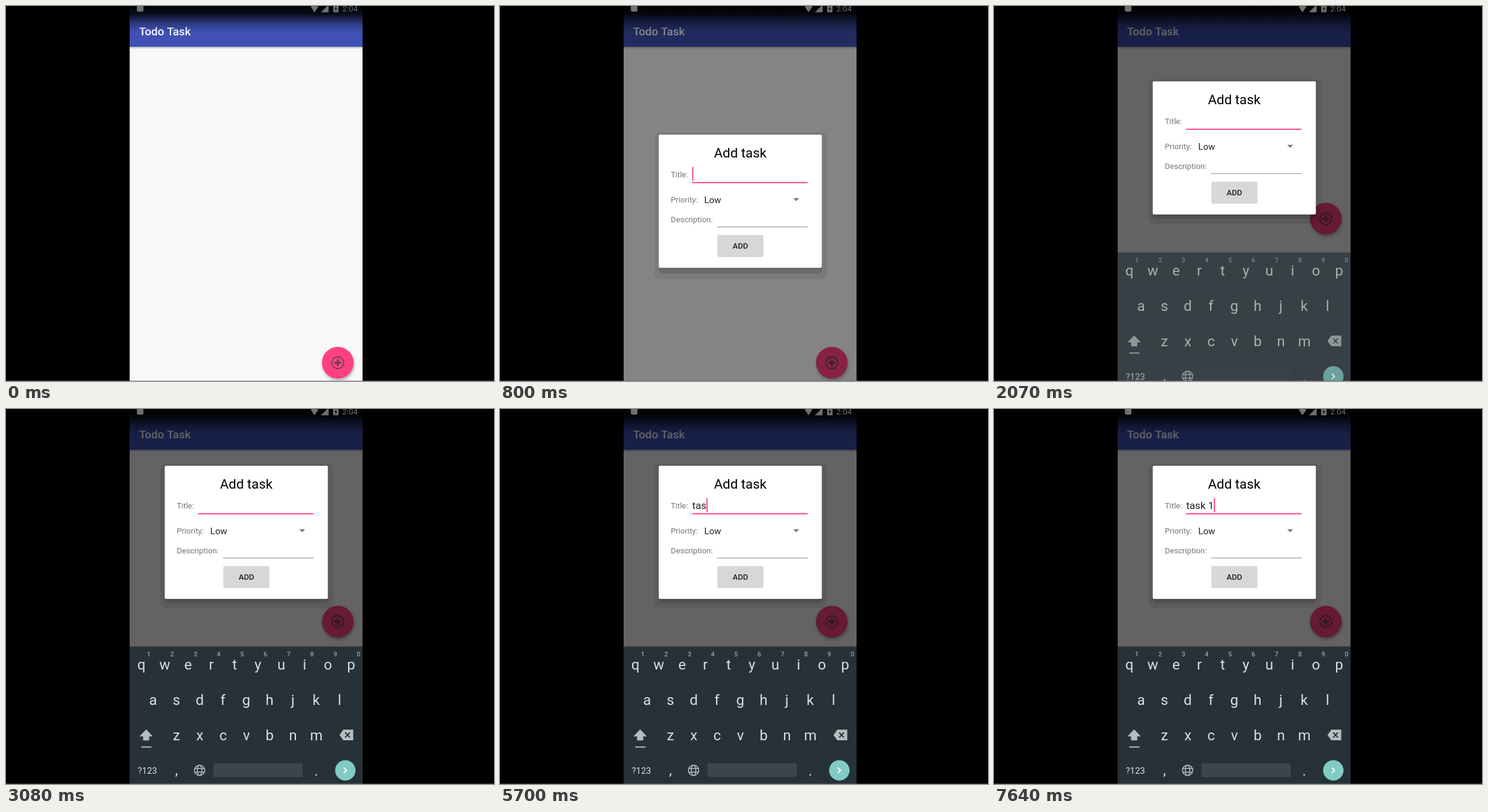
An HTML page with a canvas for the animation above (8000 ms loop, 813 by 626 pixels).

```html
<!DOCTYPE html>
<html lang="en">
<head>
<meta charset="utf-8">
<title>Todo Task</title>
<style>
html, body { margin: 0; width: 100%; height: 100%; overflow: hidden; background: #000; }
canvas { display: block; }
</style>
</head>
<body>
<canvas id="stage" width="813" height="626"></canvas>
<script>
const ctx = document.getElementById('stage').getContext('2d');
const LOOP = 8000;
const LEFT = 206, RIGHT = 594, WIDTH = RIGHT - LEFT;
const PINK = '#ff4081', KEY_TEXT = '#dcdfe0', KEY_ICON = '#b7bcbf', PRESSED = '#3f484d';
const PITCH = 38.83;
const ROWS = [
  { keys: 'qwertyuiop', x: 225.6, base: 434.5, top: 403 },
  { keys: 'asdfghjkl', x: 245, base: 493.5, top: 463 },
  { keys: 'zxcvbnm', x: 284, base: 552.5, top: 523 }
];

// Stepped timelines: [start ms, value]
const DIM = [[0, 0], [680, 0.26], [800, 0.47], [950, 0.57], [1070, 0.6]];
const FADE = [[0, 0], [680, 0.9], [800, 1]];
const RIPPLE = [[0, 0], [530, 20], [680, 0]];
const LIFT = [[0, 0], [2070, 89], [2220, 117], [2340, 120]];
const BOARD = [[0, 0], [2070, 0.7], [2220, 0.95], [2340, 1]];
const TYPED = [[0, ''], [5130, 't'], [5430, 'ta'], [5700, 'tas'], [6220, 'task'], [6630, 'task '], [7640, 'task 1']];
const HELD = [[0, ''], [4980, 't'], [5130, ''], [5280, 'a'], [5430, ''], [5550, 's'], [5700, ''],
  [6100, 'k'], [6220, ''], [6500, ' '], [6630, ''], [7060, 'q'], [7360, '']];
const BLINKS = [1070, 1520, 2070, 2490, 3080, 3550, 3980, 4570, 7210, 7640];

function at(line, t) {
  let value = line[0][1];
  for (const [start, v] of line) if (t >= start) value = v;
  return value;
}

function rect(x, y, w, h, color, r = 0) {
  ctx.fillStyle = color;
  ctx.beginPath();
  ctx.roundRect(x, y, w, h, r);
  ctx.fill();
}

function circle(x, y, r, color) {
  ctx.fillStyle = color;
  ctx.beginPath();
  ctx.arc(x, y, r, 0, Math.PI * 2);
  ctx.fill();
}

function poly(color, ...p) {
  ctx.fillStyle = color;
  ctx.beginPath();
  for (let i = 0; i < p.length; i += 2) ctx.lineTo(p[i], p[i + 1]);
  ctx.closePath();
  ctx.fill();
}

function line(color, width, ...p) {
  ctx.strokeStyle = color;
  ctx.lineWidth = width;
  ctx.beginPath();
  for (let i = 0; i < p.length; i += 2) ctx.lineTo(p[i], p[i + 1]);
  ctx.stroke();
}

function text(str, x, y, size, color, align = 'left', weight = 400) {
  ctx.font = `${weight} ${size}px Roboto, sans-serif`;
  ctx.textAlign = align;
  ctx.fillStyle = color;
  ctx.fillText(str, x, y);
}

function drawFab(y, ripple) {
  const x = 552.8, ink = '#63434f';
  ctx.save();
  ctx.shadowColor = 'rgba(0,0,0,0.3)';
  ctx.shadowBlur = 5;
  ctx.shadowOffsetX = 1;
  ctx.shadowOffsetY = 3;
  circle(x, y, 26.4, PINK);
  ctx.restore();
  if (ripple) circle(x, y, ripple, 'rgba(255,255,255,0.22)');
  ctx.strokeStyle = ink;
  ctx.lineWidth = 1.7;
  ctx.beginPath();
  ctx.arc(x, y, 9.9, 0, Math.PI * 2);
  ctx.stroke();
  rect(x - 5.6, y - 1.5, 11.2, 3, ink);
  rect(x - 1.5, y - 5.6, 3, 11.2, ink);
}

function drawApp(t) {
  rect(LEFT, 0, WIDTH, 626, '#f8f8fa');
  const shade = ctx.createLinearGradient(0, 68, 0, 72);
  shade.addColorStop(0, 'rgba(0,0,0,0.28)');
  shade.addColorStop(1, 'rgba(0,0,0,0)');
  rect(LEFT, 68, WIDTH, 4, shade);
  rect(LEFT, 0, WIDTH, 68, '#3f51b5');
  text('Todo Task', 221.7, 49, 18.9, '#fff', 'left', 500);
  drawFab(t < 2070 ? 595.5 : 355, at(RIPPLE, t));
  rect(LEFT, 0, WIDTH, 626, `rgba(0,0,0,${at(DIM, t)})`);
}

function drawStatus() {
  const veil = ctx.createLinearGradient(0, 0, 0, 46);
  [[0, 0.98], [0.28, 0.86], [0.42, 0.62], [0.65, 0.28], [0.85, 0.08], [1, 0]]
    .forEach(([p, a]) => veil.addColorStop(p, `rgba(0,0,0,${a})`));
  rect(LEFT, 0, WIDTH, 46, veil);
  const gray = '#707070';
  rect(218, -3, 11, 12.5, gray, 3);
  poly(gray, 507.5, 1, 514, -1, 520.5, 1, 514, 10.5);
  poly(gray, 524.5, 10.5, 537.5, 10.5, 537.5, -2);
  rect(545, -3, 9, 13.5, gray, 1);
  poly('#10131f', 550.5, 0, 547, 5, 549, 5, 548.5, 9, 552, 4, 550, 4);
  text('2:04', 560.3, 9, 13.3, gray);
}

function drawDialog(t) {
  const alpha = at(FADE, t);
  if (!alpha) return;
  const lift = at(LIFT, t), drop = lift / 120;
  ctx.save();
  ctx.translate(0, -lift);
  rect(257.5, 211, 287.5, 245 - drop * 4, 'rgba(0,0,0,0.08)', 10);
  rect(264, 214, 273, 232.5 - drop * 3, 'rgba(0,0,0,0.13)', 7);
  ctx.globalAlpha = alpha;
  rect(264.5, 214.7, 271.7, 222.3, '#fff', 2);
  text('Add task', 400.3, 253.3, 22.3, '#000', 'center');
  const label = '#757575', ink = '#212121';
  text('Title:', 284.5, 286, 13.2, label);
  text('Priority:', 284.5, 328, 13.2, label);
  text('Description:', 284.5, 360.7, 13.2, label);
  text('Low', 340.3, 329, 15.1, ink);
  poly(label, 488.7, 320.8, 498.3, 320.8, 493.5, 325.7);
  rect(320.2, 293.7, 192.3, 2, PINK);
  rect(361.5, 368.2, 151, 1, '#858585');
  rect(362.2, 383, 76.4, 36, 'rgba(0,0,0,0.16)', 2);
  rect(362.2, 382.3, 76.4, 35.5, '#d6d7d7', 2);
  text('ADD', 400.4, 404.7, 13.2, ink, 'center', 500);
  const typed = at(TYPED, t);
  text(typed, 320.3, 287, 17, ink);
  if (BLINKS.filter(b => t >= b).length % 2 === 0) {
    rect(320.3 + ctx.measureText(typed).width, 268.4, 1.9, 23.6, PINK);
  }
  ctx.restore();
}

function drawGlobe(x, y) {
  ctx.strokeStyle = KEY_ICON;
  ctx.lineWidth = 1.5;
  for (const rx of [8.6, 3.8]) {
    ctx.beginPath();
    ctx.ellipse(x, y, rx, 8.6, 0, 0, Math.PI * 2);
    ctx.stroke();
  }
  for (const dy of [-3, 3]) line(KEY_ICON, 1.5, x - 8, y + dy, x + 8, y + dy);
}

function drawKeyboard(t) {
  const shown = at(BOARD, t), held = at(HELD, t);
  if (!shown) return;
  ctx.save();
  ctx.globalAlpha = shown;
  ctx.translate(0, (1 - shown) * 50);
  rect(LEFT, 396.5, WIDTH, 230, '#263238');
  ROWS.forEach((row, r) => [...row.keys].forEach((key, i) => {
    const x = row.x + i * PITCH;
    if (key === held) rect(x - 16, row.top, 32, 44, PRESSED, 1);
    text(key, x, row.base, 24, KEY_TEXT, 'center');
    if (r === 0) text((i + 1) % 10, x + 12.3, 413, 10.8, '#98a1a5', 'center', 500);
  }));

  poly(KEY_ICON, 233.5, 534.8, 244.6, 546.4, 238.6, 546.4, 238.6, 553.3,
    228.4, 553.3, 228.4, 546.4, 222.4, 546.4);
  rect(225.3, 563.3, 17, 2, KEY_ICON);
  poly(KEY_ICON, 555.6, 544.3, 562, 535.3, 578.5, 535.3, 578.5, 553, 562, 553);
  line('#263238', 2, 565, 540, 573, 548.4);
  line('#263238', 2, 573, 540, 565, 548.4);

  text('?123', 235.6, 608.5, 14.9, KEY_TEXT, 'center');
  text(',', 284, 611, 24, KEY_TEXT, 'center');
  text('.', 516.8, 611.5, 24, KEY_TEXT, 'center');
  drawGlobe(322.5, 603.2);
  rect(345.6, 591.5, 148.7, 23, held === ' ' ? '#535c61' : '#3e454a', 3);
  circle(565.3, 603.3, 17, '#80cbc4');
  line('#fff', 2, 562.7, 598.8, 567.3, 603.3, 562.7, 607.8);

  if (t >= 7360 && t < 7640) {
    rect(209.5, 336.5, 40.5, 53, '#37474f', 3);
    text('1', 229.6, 371, 24, '#fff', 'center');
  }
  ctx.restore();
}

function draw(t) {
  rect(0, 0, 813, 626, '#000');
  ctx.save();
  ctx.beginPath();
  ctx.rect(LEFT, 0, WIDTH, 626);
  ctx.clip();
  drawApp(t);
  drawStatus();
  drawDialog(t);
  drawKeyboard(t);
  ctx.restore();
  rect(0, 625, 813, 1, 'rgba(110,110,110,0.5)');
}

let begin = null;
function tick(now) {
  if (begin === null) begin = now;
  draw((now - begin) % LOOP);
  requestAnimationFrame(tick);
}
draw(0);
requestAnimationFrame(tick);
</script>
</body>
</html>
```
